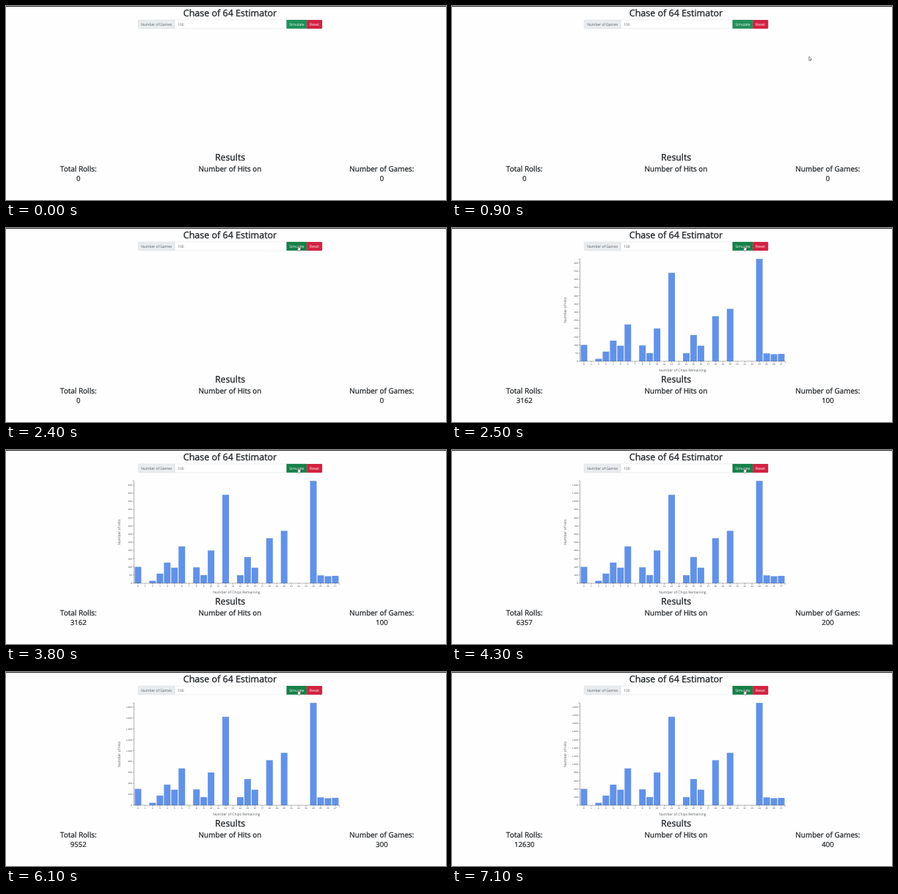
These frames come from a looping animation (600x265 px, 7300 ms). An HTML page with a canvas:

```html
<!DOCTYPE html>
<html lang="en">
<head>
<meta charset="utf-8">
<title>Chase of 64 Estimator</title>
<style>
  html, body { margin: 0; width: 100%; height: 100%; overflow: hidden; background: #fefefe; }
  canvas { display: block; width: 600px; height: 265px; }
</style>
</head>
<body>
<canvas id="stage"></canvas>
<script>
const W = 600, H = 265, LOOP = 7300, STEP = 100;
const UI = '"Open Sans", "Noto Sans", sans-serif';
const PLAIN = '"Liberation Sans", Arial, sans-serif';
const INK = '#212529', MUTED = '#555a60', AXIS = '#444';

const canvas = document.getElementById('stage');
const ctx = canvas.getContext('2d');
const dpr = window.devicePixelRatio || 1;
canvas.width = W * dpr;
canvas.height = H * dpr;

// Mean hits per game for each number of chips left, from 0 up
const rates = [1, 0, .15, .59, 1.26, .95, 2.25, 0, .97, .5, 2, 0, 5.4, 0,
  .49, 1.6, .95, 0, 2.75, 0, 3.2, 0, 0, 0, 6.25, .48, .43, .45];
const clicks = [2500, 3900, 4800, 6200];
const rolls = [0, 3162, 6357, 9552, 12630];
const GAMES_PER_CLICK = 100;

function text(str, x, y, size, color = INK, align = 'center', family = UI) {
  ctx.font = `${size}px ${family}`;
  ctx.fillStyle = color;
  ctx.textAlign = align;
  ctx.fillText(str, x, y);
}

// Medium weight: regular glyphs with a thin outline
function heading(str, x, y, size) {
  text(str, x, y, size);
  ctx.strokeStyle = INK;
  ctx.lineWidth = size * 0.026;
  ctx.strokeText(str, x, y);
}

function box(x, w, radii, fill, stroke) {
  ctx.beginPath();
  ctx.roundRect(x, 18.9, w, 12, radii);
  ctx.fillStyle = fill;
  ctx.fill();
  if (stroke) {
    ctx.strokeStyle = stroke;
    ctx.lineWidth = 0.35;
    ctx.stroke();
  }
}

function line(x1, y1, x2, y2) {
  ctx.beginPath();
  ctx.moveTo(x1, y1);
  ctx.lineTo(x2, y2);
  ctx.stroke();
}

function drawForm(hover) {
  const r = 1.2, y = 26.8;
  box(180.2, 50, [r, 0, 0, r], '#e9ecef', '#ced4da');
  box(230.2, 152.3, 0, '#ffffff', '#ced4da');
  box(382.5, 27.6, 0, hover ? '#178049' : '#218f5a');
  box(410.1, 21.1, [0, r, r, 0], '#d22342');
  text('Number of Games', 205.2, y, 4.9, MUTED);
  text('100', 234.2, y, 4.9, MUTED, 'left');
  text('Simulate', 396.4, y, 5, '#ffffff');
  text('Reset', 420.5, y, 5, '#ffffff');
}

// Round step of 1, 2 or 5 times a power of ten, for about ten ticks
function tickStep(max) {
  const raw = max / 10, power = 10 ** Math.floor(Math.log10(raw)), f = raw / power;
  return power * (f >= Math.sqrt(50) ? 10 : f >= Math.sqrt(10) ? 5 : f >= Math.SQRT2 ? 2 : 1);
}

function drawChart(games) {
  const left = 174.5, right = 454.5, top = 42.2, base = 182;
  const max = Math.max(...rates) * games, tick = tickStep(max);
  const step = (right - left) / (rates.length + 0.1);
  const yOf = v => base - (base - top) * v / max;

  ctx.fillStyle = '#6292e8';
  rates.forEach((rate, i) => {
    const y = yOf(rate * games);
    ctx.fillRect(left + step * (i + 0.1), y, step * 0.9, base - y);
  });

  ctx.strokeStyle = AXIS;
  ctx.lineWidth = 0.4;
  line(left, top, left, base);
  line(left, base, right, base);
  line(left - 1.9, top, left, top);
  line(right, base, right, base + 1.9);
  for (let v = 0; v <= max; v += tick) {
    const y = yOf(v);
    line(left - 1.9, y, left, y);
    text(v.toLocaleString('en-US'), left - 2.8, y + 1.1, 3.1, AXIS, 'right', PLAIN);
  }
  rates.forEach((_, i) => {
    const x = left + step * (i + 0.55);
    line(x, base, x, base + 1.9);
    text(String(i), x, base + 4.9, 3.1, AXIS, 'center', PLAIN);
  });

  text('Number of Chips Remaining', 314.3, 196, 4.9, MUTED);
  ctx.save();
  ctx.translate(155.7, 112.3);
  ctx.rotate(-Math.PI / 2);
  text('Number of Hits', 0, 0, 4.9, MUTED);
  ctx.restore();
}

const ARROW = new Path2D('M0 0V5.4L1.3 4.2 2.1 6 2.9 5.6 2.1 3.9 3.8 3.8Z');
const HAND = new Path2D('M-.5 0H.5L.6 2.4 3 3 3.4 3.6 3 5.8 2.5 7H0L-1.9 4.3-1.5 3.8-.5 4.6Z');

function drawPointer(shape, x, y) {
  ctx.save();
  ctx.translate(x, y);
  ctx.fillStyle = '#ffffff';
  ctx.strokeStyle = '#222';
  ctx.lineWidth = 0.5;
  ctx.lineJoin = 'round';
  ctx.fill(shape);
  ctx.stroke(shape);
  ctx.restore();
}

// Eased progress from 0 to 1 between two times
function ease(t, from, to) {
  const k = Math.min(1, Math.max(0, (t - from) / (to - from)));
  return k * k * (3 - 2 * k);
}

function draw(t) {
  const runs = clicks.filter(at => at <= t).length;
  const games = runs * GAMES_PER_CLICK;
  const hover = t >= 1400;

  ctx.setTransform(dpr, 0, 0, dpr, 0, 0);
  ctx.textRendering = 'geometricPrecision';
  ctx.fillStyle = '#fefefe';
  ctx.fillRect(0, 0, W, H);
  ctx.fillStyle = '#2a2a2a';
  ctx.fillRect(0, 0, W, 1);

  heading('Chase of 64 Estimator', 305.5, 13.5, 12.5);
  drawForm(hover);
  if (games) drawChart(games);

  heading('Results', 305.5, 210.6, 12.3);
  heading('Total Rolls:', 98.7, 226.2, 10);
  heading(String(rolls[runs]), 98.7, 238.6, 9.6);
  heading('Number of Hits on', 305.5, 226.2, 9.95);
  heading('Number of Games:', 512.4, 226.2, 9.95);
  heading(String(games), 512.4, 238.6, 9.6);

  if (t >= 600) {
    const move = ease(t, 600, 1400), settle = ease(t, 1500, 2000);
    drawPointer(hover ? HAND : ARROW, 527 - 127 * move - 1.4 * settle, 89 - 63 * move - 1.8 * settle);
  }
}

let start;
function frame(now) {
  start ??= now;
  draw(Math.floor((now - start) % LOOP / STEP) * STEP);
  requestAnimationFrame(frame);
}
draw(0);
requestAnimationFrame(frame);
</script>
</body>
</html>
```
